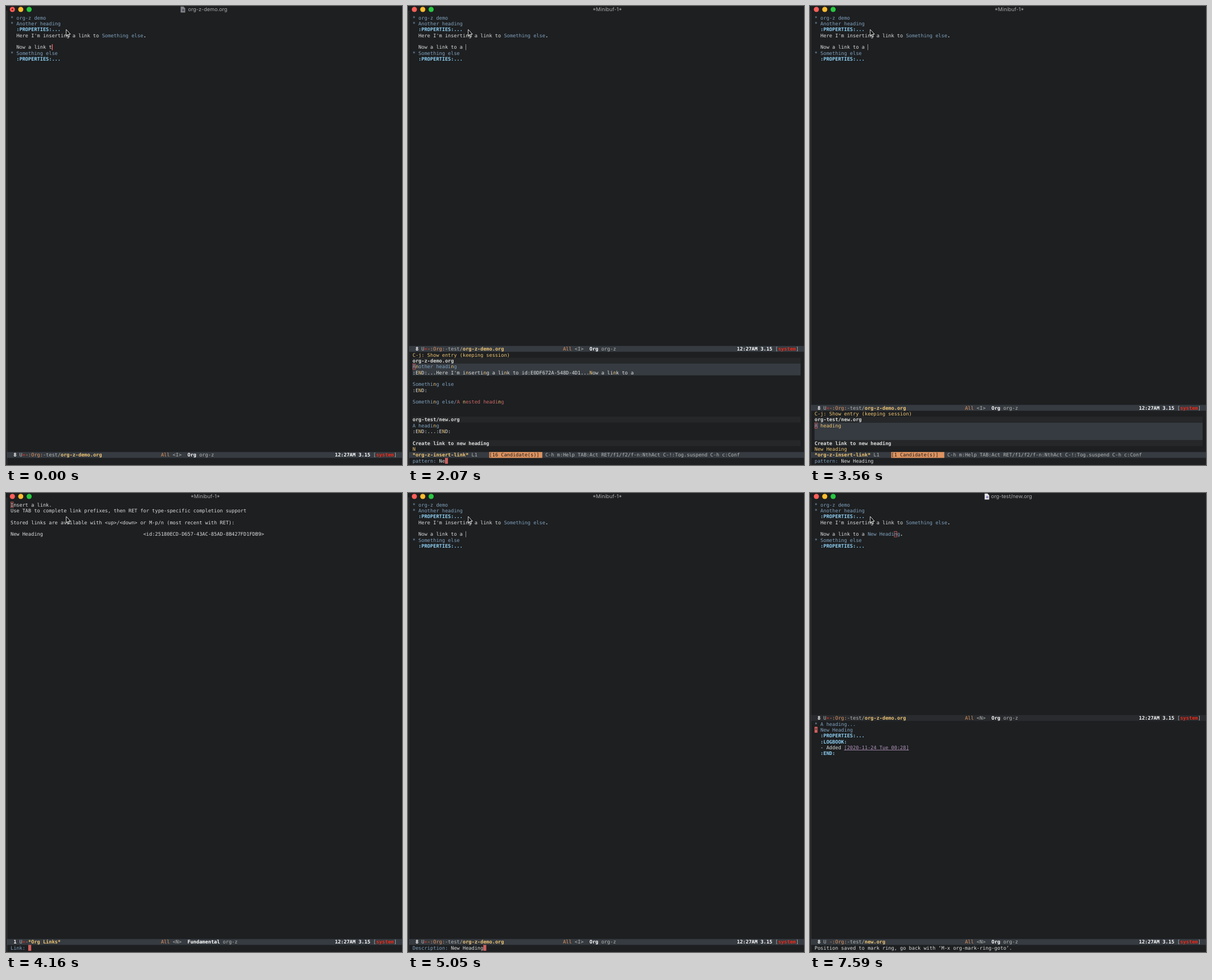
An HTML page for the animation above (8000 ms loop, 695x806 px).

```html
<!DOCTYPE html>
<html lang="en">
<head>
<meta charset="utf-8">
<title>org-z demo</title>
<style>
html, body { margin: 0; width: 100%; height: 100%; overflow: hidden; background: #1d1f21; }
svg { display: block; width: 695px; height: 806px; }
text { font: 8.6px "DejaVu Sans Mono", monospace; white-space: pre; text-rendering: geometricPrecision; }
.title { font: 9.1px Inter, sans-serif; fill: #a8aaab; }
.b { font-weight: bold; }
.u { text-decoration: underline; }
</style>
</head>
<body>
<svg id="stage" viewBox="0 0 695 806" xmlns="http://www.w3.org/2000/svg"></svg>
<script>
(() => {
const LOOP = 8000, CW = 5.175, LH = 10.35;
const C = {
  bg: '#1d1f21', fg: '#dcdedc', dim: '#b4b7b4', white: '#ffffff', blue: '#81a2be', sky: '#8fd0f4',
  yellow: '#f0c674', orange: '#de935f', red: '#cc6666', alert: '#f02818', violet: '#b294bb',
  bar: '#363b41', idle: '#292b2e', head: '#252729', cursor: '#d0605e'
};
const stage = document.getElementById('stage');

// Geometry: upper rows count down from the title, lower rows up from the echo area.
const colX = c => 8 + c * CW;
const upper = r => 20.6 + r * LH;
const lower = k => 798.7 - k * LH;
const esc = s => s.replace(/&/g, '&amp;').replace(/</g, '&lt;').replace(/>/g, '&gt;');
const rect = (x, y, w, h, fill) => `<rect x="${x}" y="${y}" width="${w}" height="${h}" fill="${fill}"/>`;
const strip = (y, fill, x = 8, end = 689, rows = 1) => rect(x, y - LH / 2, end - x, LH * rows, fill);

// Each part is [text, colour, classes]; parts follow one another on the grid.
function row(y, col, ...parts) {
  let out = '';
  for (const [s, fill = C.fg, cls = ''] of parts) {
    if (s.trim()) out += `<tspan x="${colX(col).toFixed(2)}" fill="${fill}" class="${cls}">${esc(s)}</tspan>`;
    col += s.length;
  }
  return `<text y="${(y + 3.1).toFixed(2)}">${out}</text>`;
}

const block = (col, y) => rect(colX(col), y - 5.2, CW, LH, C.cursor);
const beam = (col, y, active) => rect(colX(col), y - 5.2, active ? 1.5 : 0.8, LH, active ? '#e5625c' : '#b0b2b0');
const hollow = (col, y) =>
  `<rect x="${colX(col) + 0.3}" y="${y - 4.8}" width="${CW - 0.6}" height="9.6" fill="none" stroke="${C.cursor}" stroke-width=".8"/>`;

function chrome(title, x, icon, dirty) {
  const lights = ['#fe5f57', '#febc2e', '#28c840']
    .map((f, i) => `<circle cx="${11.2 + i * 14.7}" cy="6" r="4.5" fill="${f}"/>`).join('');
  const dot = dirty ? '<circle cx="11.2" cy="6" r="1.5" fill="#7d1511"/>' : '';
  const sheet = icon
    ? `<g opacity="${dirty ? 0.5 : 1}"><path d="M306.5 1h5l3 3v7.5h-8z" fill="#e4e4e8"/>` +
      '<circle cx="311" cy="7.3" r="2" fill="#8c7fb4"/></g>' : '';
  return rect(0, 0, 695, 806, C.bg) + rect(0, 0, 1, 806, '#141516') + rect(1, 8, 0.8, 798, '#47494b') +
    lights + dot + sheet + `<text class="title" x="${x}" y="9.4">${title}</text>`;
}
const docChrome = () => chrome('org-z-demo.org', 319.5, true, true);
const miniChrome = () => chrome('*Minibuf-1*', 324, false, false);

function modeline(y, o = {}) {
  const { num = '8', mark = '×', name = 'org-z-demo.org', org = true, state = 'I', idle = false } = o;
  const path = org ? [[':Org:', C.orange], ['-test/', C.dim]] : [];
  const mode = org ? 'Org' : 'Fundamental';
  return strip(y, idle ? C.idle : C.bar, 2, 695) +
    row(y, 1, [num, C.white, 'b'], [' U', C.dim], [mark, C.alert], ['-', C.orange], ...path, [name, C.yellow, 'b']) +
    row(y, 51, ['All', C.orange], [` <${state}>  `, C.dim], [mode, C.white, 'b'], [' org-z', C.dim]) +
    row(y, 110, ['12:27AM 3.15', C.white, 'b'], [' [', C.dim], ['system', C.alert, 'b'], [']', C.dim]);
}

// The notes buffer; tail is what follows "Now a link " and link its linked part.
function notes(tail, link = '', end = '', under = '') {
  const props = r => row(upper(r), 2, [':PROPERTIES:...', C.sky, 'b']);
  const heading = (r, s) => row(upper(r), 0, ['* ' + s, C.blue]);
  return under + heading(0, 'org-z demo') + heading(1, 'Another heading') + props(2) +
    row(upper(3), 2, ["Here I'm inserting a link to "], ['Something else', C.blue], ['.', C.fg, 'b']) +
    row(upper(5), 2, ['Now a link ' + tail], [link, C.blue], [end, C.fg, 'b']) +
    heading(6, 'Something else') + props(7);
}

const pointer = '<path d="M105.7 41.3v11l2.4-2.2 1.7 3.9 1.7-.8-1.7-3.7h3.3z" fill="#000" stroke="#fff" stroke-width=".9"/>';

// Split a line so that matches of any word of the pattern turn yellow.
function hits(s, fill, pattern) {
  const words = pattern.trim().split(/\s+/).filter(Boolean);
  if (!words.length) return [[s, fill]];
  return s.split(new RegExp(`(${words.join('|')})`, 'i'))
    .map((p, i) => [p, i % 2 ? C.yellow : fill]);
}

const KEYS = 'C-h m:Help TAB:Act RET/f1/f2/f-n:NthAct C-!:Tog.suspend C-h c:Conf';
function helmLine(name, line, count, keys = KEYS) {
  const y = lower(1), c = name.length + 7;
  return strip(y, C.bar, 2, 695) + strip(y, C.orange, colX(c), colX(c + 18)) +
    row(y, 0, [name, C.yellow, 'b'], [' L' + line, C.dim]) +
    row(y, c, [`[${count} Candidate(s)]`, C.bg]) + row(y, c + 19, [keys, C.dim]);
}
const source = (k, s) => strip(lower(k), C.head) + row(lower(k), 0, [s, C.fg, 'b']);
const action = (k, s) => row(lower(k), 0, [`C-j: ${s} (keeping session)`, C.yellow]);
const ask = (label, s, on) => (on ? block(label.length + s.length, lower(0)) : '') +
  row(lower(0), 0, [label, C.blue], [s]);

// Candidate list for the pattern `found`, with `typed` in the prompt.
function search(typed, found, on = true, second = false) {
  const line = (k, s, fill = C.blue) => row(lower(k), 0, ...hits(s, fill, found));
  const nested = k => row(lower(k), 0, ...hits('Something else/', C.blue, found), ...hits('A nested heading', C.red, found));
  let out, height;
  if (found.length > 2) {
    height = 9;
    const y = lower(second ? 2 : 6);
    out = action(8, second ? 'DoNothing' : 'Show entry') + strip(y, C.bar, 8, 689, second ? 1 : 3) +
      line(6, 'A heading') + hollow(0, y);
  } else if (found.length === 2) {
    height = 13;
    out = action(12, 'Show entry') + source(11, 'org-z-demo.org') + strip(lower(10), C.bar, 8, 689, 2) +
      nested(10) + hollow(0, lower(10)) + line(6, 'A heading') + line(5, ':END:...:END:', C.fg);
  } else {
    height = 19;
    out = action(18, 'Show entry') + source(17, 'org-z-demo.org') + strip(lower(16), C.bar, 8, 689, 2) +
      line(16, 'Another heading') +
      line(15, ":END:...Here I'm inserting a link to id:E0DF672A-548D-4D1...Now a link to a", C.fg) +
      hollow(0, lower(16)) + line(13, 'Something else') + line(12, ':END:', C.fg) + nested(10) +
      line(6, 'A heading') + line(5, ':END:...:END:', C.fg);
  }
  return miniChrome() + notes('to a ') + beam(18, upper(5), false) + modeline(lower(height)) + out +
    source(7, 'org-test/new.org') + source(3, 'Create link to new heading') +
    row(lower(2), 0, [found, C.yellow]) + (second ? hollow(0, lower(2)) : '') +
    helmLine('*org-z-insert-link*', second ? 2 : 1, found.length < 2 ? 16 : 1) + ask('pattern: ', typed, on);
}

const ID = 'id:25180ECD-D657-43AC-85AD-8B427FD1FDB9';
const TYPES = ('message x-devonthink-item mac-evernote mac-outlook acrobat skim addressbook x-together-item ' +
  'mairix pdf mu4e id eww rmail mhe irc info gnus docview bibtex bbdb w3m elfeed file+sys file+emacs shell').split(' ');

function orgLinks(listed, on = true) {
  let out = miniChrome() + row(upper(0), 0, ['Insert a link.']) + hollow(0, upper(0)) +
    row(upper(1), 0, ['Use TAB to complete link prefixes, then RET for type-specific completion support']) +
    row(upper(3), 0, ['Stored links are available with <up>/<down> or M-p/n (most recent with RET):']) +
    row(upper(5), 0, ['New Heading']) + row(upper(5), 45, [`<${ID}>`]) +
    modeline(lower(listed ? 31 : 1), { num: '1', name: '*Org Links*', org: false, state: 'N' }) +
    ask('Link: ', '', on);
  if (listed) {
    out += action(30, 'DoNothing') + source(29, 'org-insert-link') + strip(lower(28), C.bar) +
      row(lower(28), 0, [ID]) + hollow(0, lower(28)) +
      TYPES.map((s, i) => row(lower(27 - i), 0, [s + ':'])).join('') +
      helmLine('*helm-mode-org-insert-link*', 1, 36, 'C/M-RET:Empty ' + KEYS);
  }
  return out;
}

const typing = (tail, col) => docChrome() + notes(tail) + beam(col, upper(5), true) + modeline(lower(1));
const linked = (end, cursor, state = 'I') =>
  docChrome() + notes('to a ', 'New Heading', end, cursor) + modeline(lower(1), { state });
const describe = () => miniChrome() + notes('to a ') + beam(18, upper(5), false) + modeline(lower(1)) +
  ask('Description: ', 'New Heading', true);

function visit() {
  const line = (k, s) => row(lower(k), 2, [s, C.sky, 'b']);
  return chrome('org-test/new.org', 317.7, true, false) + notes('to a ', 'New Heading', '.') + hollow(27, upper(5)) +
    modeline(lower(39), { state: 'N', idle: true }) + row(lower(38), 0, ['* A heading...', C.blue]) +
    block(0, lower(37)) + row(lower(37), 0, ['*', C.bg], [' New Heading', C.blue]) +
    line(36, ':PROPERTIES:...') + line(35, ':LOGBOOK:') +
    row(lower(34), 2, ['- Added '], ['[2020-11-24 Tue 00:28]', C.violet, 'u']) + line(33, ':END:') +
    modeline(lower(1), { mark: ' ', name: 'new.org', state: 'N' }) +
    row(lower(0), 0, ['Position saved to mark ring, go back with ‘M-x org-mark-ring-goto’.']);
}

const keyed = ['Ne', 'New', 'New ', 'New H', 'New He', 'New Head', 'New Headi', 'New Heading'];
const scenes = [
  [0, () => typing('t', 14)],
  [150, () => typing('to ', 16)],
  [740, () => typing('to a', 17)],
  [890, () => typing('to a ', 18)],
  [1330, () => search('', '')],
  [1780, () => search('', '', false)],
  ...keyed.map((s, i) => [2070 + Math.round(i * 1040 / 7),
    () => search(s, i === 7 ? s : i ? keyed[i - 1] : 'N')]),
  [3560, () => search('New Heading', 'New Heading', false)],
  [3710, () => search('New Heading', 'New Heading', true, true)],
  [4160, () => orgLinks(false)],
  [4310, () => orgLinks(true)],
  [4750, () => orgLinks(true, false)],
  [5050, describe],
  [5650, () => linked('', beam(29, upper(5), true))],
  [6250, () => linked('', '')],
  [6550, () => linked('.', beam(30, upper(5), true))],
  [6700, () => linked('.', block(29, upper(5)), 'N')],
  [6850, () => linked('.', block(28, upper(5)), 'N')],
  [6990, () => linked('.', block(27, upper(5)), 'N')],
  [7590, visit]
];

let shown = -1;
function draw(t) {
  let i = scenes.length - 1;
  while (i > 0 && scenes[i][0] > t) i--;
  if (i === shown) return;
  shown = i;
  stage.innerHTML = scenes[i][1]() + pointer;
}

const start = performance.now();
function tick() {
  draw((performance.now() - start) % LOOP);
  requestAnimationFrame(tick);
}
tick();
})();
</script>
</body>
</html>
```
